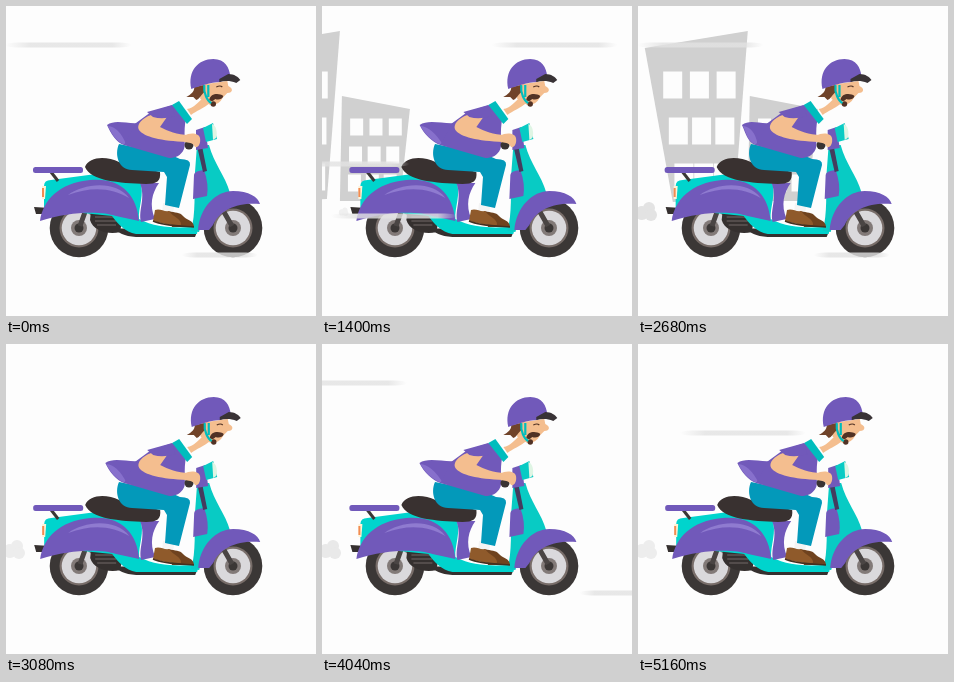
Recreate the animation shown at these times as an HTML page. Size 310 by 310 pixels, loop 5.2 s.

```html
<!DOCTYPE html>
<html lang="en">
<head>
<meta charset="utf-8">
<title>Scooter ride</title>
<style>
html, body { margin: 0; width: 100%; height: 100%; overflow: hidden; background: #fdfdfd; }
svg { display: block; width: 100vw; height: 100vh; }
</style>
</head>
<body>
<svg viewBox="0 0 310 310">
  <defs>
    <linearGradient id="fade">
      <stop offset="0" stop-color="#e2e2e2" stop-opacity="0"/>
      <stop offset=".2" stop-color="#e2e2e2" stop-opacity=".8"/>
      <stop offset=".85" stop-color="#e2e2e2" stop-opacity=".8"/>
      <stop offset="1" stop-color="#e2e2e2" stop-opacity="0"/>
    </linearGradient>
    <g id="wheel">
      <circle r="29.3" fill="#3b3736"/>
      <circle r="19.5" fill="#786d69"/>
      <circle r="17.3" fill="#dad9dc"/>
      <circle r="8" fill="#827a78"/>
      <circle r="4.5" fill="#3b3736"/>
    </g>
  </defs>

  <g id="town1"></g>
  <g id="town2"></g>
  <g id="puff" fill="#e3e3e3">
    <circle cx="-4" cy="1" r="7"/><circle cx="3" cy="-4" r="6"/><circle cx="5" cy="3" r="6"/>
  </g>

  <!-- wheels -->
  <use href="#wheel" x="73" y="222"/>
  <use href="#wheel" x="227" y="222"/>
  <path stroke="#4a4544" stroke-width="5" d="M79 206 74 220M218 206 226 220"/>

  <g id="scooter">
    <path fill="#35302f" d="M28 201 44 202 41 208H30ZM85 205H118L114 226C103 229 87 225 84 214ZM108 222 191 226 189 231H130C118 230 112 227 108 222Z"/>
    <path fill="none" stroke="#5d5655" stroke-width="1.5" d="M89 211h20M89 215h21M91 219h19"/>
    <path fill="#00d4cd" d="M38 180Q38 174 45 174L90 168 134 175C139 188 132 202 133 213 150 222 170 222 186 221L192 222 191 228 130 228C119 226 112 218 106 210L38 203Z"/>
    <path fill="#fff3d6" d="M36 180h4l-1 13h-3Z"/>
    <path fill="#f28c52" d="M36 182h2v9h-2Z"/>
    <path fill="#7159ba" d="M134 177H153C146 187 143 199 149 213L135 216C132 204 140 193 134 177Z"/>
    <path fill="#7159ba" d="M34 215C37 194 53 177 84 174 115 171 131 189 133 215L110 210C95 205 65 205 34 215Z"/>
    <path fill="#8f7bd0" d="M62 189C78 177 110 174 123 192 106 182 86 180 62 189Z"/>
    <path stroke="#3b3736" stroke-width="3" d="M45 166 52 175"/>
    <rect x="27" y="161" width="50" height="6" rx="2.5" fill="#7159ba"/>
    <path fill="#393130" d="M79 161C83 150 101 150 113 156 126 163 141 162 154 166 155 175 151 178 140 178 113 177 85 175 79 161Z"/>

    <!-- leg shield and front fender -->
    <path fill="#08cbc4" d="M191 139H203C208 158 219 169 224 187 208 194 198 207 193 226L185 225C190 207 188 187 189 166Z"/>
    <path fill="#7159ba" d="M188 169Q188 165 198 164 203 178 201 190L187 193Z"/>
    <path fill="#443c5e" d="M191 140H196L201 165 197 166Z"/>
    <path fill="#7159ba" d="M190 124 199 121 202 142 190 144Z"/>
    <path fill="#08cbc4" d="M197 122 207 117 211 133 200 136Z"/>
    <path fill="#dff5e4" d="M206 118C210 119 212 127 210 132L207 134Z"/>
    <path fill="#7159ba" d="M192 224C194 201 210 185 227 185 243 185 252 191 254 198 233 196 214 203 207 219L203 224Z"/>
  </g>

  <!-- legs -->
  <path fill="#f4f4f4" d="M157 197h12l-2 10h-11Z"/>
  <path fill="#6f431f" d="M163 205C169 207 174 206 177 210 180 214 188 214 188 221H166Z"/>
  <path fill="#8f5a2b" d="M149 204C154 202 158 206 163 205 167 211 176 213 175 219 164 220 156 217 147 215Z"/>
  <path fill="none" stroke="#46301f" stroke-width="1.5" d="M147 215C158 220 174 220 188 221"/>
  <path fill="#0399ba" d="M113 138C108 149 113 164 126 164L158 166 161 171 159 199 173 202 184 159Q185 153 174 153L163 148Z"/>

  <!-- upper body -->
  <g id="rider">
    <path id="tail" fill="#7159ba"/>
    <path id="lining" fill="#8770cc"/>
    <path fill="#7159ba" d="M145 106 170 98 180 113C177 125 180 139 178 143 175 150 169 152 163 152L118 139 130 117Z"/>
    <path fill="#f4be8f" d="M145 109C136 112 130 119 133 124 138 131 155 135 181 136L183 129C171 129 162 125 154 121L161 111Z"/>
    <path fill="#7159ba" d="M141 106 166 99 169 110Q157 114 147 111Z"/>
    <path fill="#f4be8f" d="M181 103C188 102 192 96 196 93L204 97C198 102 190 105 185 109Z"/>
    <path fill="#00bdbd" d="M166 99 173 95 186 113 181 118Z"/>
  </g>
  <circle cx="183" cy="139" r="4.5" fill="#3a3433"/>
  <path fill="#f4be8f" d="M178 130C184 126 193 127 194 132 195 138 192 142 189 141 187 136 182 137 179 136Z"/>

  <g id="head">
    <path fill="#f4be8f" d="M193 79 221 75 222 80C227 82 227 87 221 87L217 91Q212 100 204 99L194 93Z"/>
    <path fill="#704329" d="M188 81 198 79 198 86C194 90 193 93 190 94L187 91 180 91C185 88 188 86 188 81Z"/>
    <path fill="#513225" d="M203 94C204 87 213 87 217 90 216 94 211 94 209 93 207 95 205 96 203 94Z"/>
    <circle cx="207" cy="98" r="2.7" fill="#513225"/>
    <path fill="none" stroke="#513225" stroke-width="1.2" d="M210 81q4-2 6 0"/>
    <path fill="none" stroke="#00bdbd" stroke-width="2.2" d="M198 79C197 87 201 95 205 97M202 79 202 91"/>
    <path fill="#7159ba" d="M185 83C181 65 192 53 207 53 219 53 223 62 224 70L214 76C204 76 194 80 185 83Z"/>
    <path fill="#393336" d="M213 73 222 68C228 68 232 71 234 74L230 77C223 74 218 75 213 76Z"/>
  </g>
  <g id="streaks"></g>
</svg>
<script>
const $ = id => document.getElementById(id);
const LOOP = 5200, TOWN_SPEED = .522, WIND_SPEED = 1.15;
const clamp = v => Math.max(0, Math.min(1, v));
const lerp = (a, b, f) => a + (b - a) * f;
const ease = v => v * v * (3 - 2 * v);

function add(parent, tag, attrs) {
  const el = document.createElementNS("http://www.w3.org/2000/svg", tag);
  for (const k in attrs) el.setAttribute(k, attrs[k]);
  parent.append(el);
  return el;
}

// A tapered wall (corners clockwise from top left) with a grid of upright windows
function house(parent, [a, b, c, d], cols, w, h, top, gap) {
  add(parent, "polygon", { points: [a, b, c, d].join(" "), fill: "#d0d0d0" });
  for (let row = 0; row < 3; row++) for (let col = 0; col < cols; col++) {
    const y = top + gap * row;
    const left = lerp(a[0], d[0], (y - a[1]) / (d[1] - a[1]));
    const right = lerp(b[0], c[0], (y - b[1]) / (c[1] - b[1]));
    const x = lerp(left, right, cols > 1 ? .23 + .29 * col : .5);
    add(parent, "rect", { x: x - w / 2, y: y - h / 2, width: w, height: h, fill: "#fdfdfd" });
  }
}

for (const town of [$("town1"), $("town2")]) {
  house(town, [[0, 42], [103, 25], [90, 193], [28, 196]], 3, 19, 27, 79, 46);
  house(town, [[105, 90], [173, 103], [163, 195], [103, 195]], 3, 13, 17, 121, 28);
}
house($("town1"), [[-34, 147], [9, 132], [17, 195], [-36, 195]], 1, 24, 28, 171, 40);

// For each height, the moments when a streak leaves the stage
const lanes = {
  39: [109, 830, 1657, 2789, 4114],
  89: [3797, 4601, 5306],
  158: [1476, 4862],
  210: [1517],
  249: [219, 935, 1767, 2190, 2899, 3590, 4330]
};
const wind = Object.entries(lanes).flatMap(([y, exits]) => exits.map(exit => {
  const width = y > 240 ? 76 : 126;
  const el = add($("streaks"), "rect", { y: y - 2.5, width, height: 5, rx: 12, ry: 2.5, fill: "url(#fade)" });
  return { el, exit, width };
}));

const move = (id, x, y = 0, rest = "") => $(id).setAttribute("transform", `translate(${x} ${y}) ${rest}`);

function draw(t) {
  move("town1", TOWN_SPEED * (1237 - t));
  move("town2", TOWN_SPEED * (2693 - t));
  for (const w of wind) w.el.setAttribute("x", WIND_SPEED * (w.exit - t) - w.width);

  // exhaust swells as it drifts back, then thins out
  const age = t % 1040, grow = ease(clamp((age - 280) / 280));
  move("puff", 25 - 17 * grow, 206, `scale(${.3 + .7 * grow})`);
  $("puff").setAttribute("opacity", clamp(grow * 2.5) * (1 - .4 * clamp((age - 800) / 200)));

  const sway = Math.sin(t / 520 * 2 * Math.PI);
  move("scooter", -.4 * sway);
  move("rider", -.4 * sway);
  move("head", .3 - sway);
  const tip = 101 + 4 * sway;
  $("tail").setAttribute("d", `M${tip} 119C${tip + 8} 113 121 118 132 117L157 137 118 139C110 136 ${tip + 4} 128 ${tip} 119Z`);
  $("lining").setAttribute("d", `M${tip + 1} 120Q${tip + 12} 121 120 138L117 138C110 135 ${tip + 5} 128 ${tip + 1} 120Z`);
}

const start = performance.now();
function tick(now) {
  const t = Math.max(0, now - start) % LOOP;
  draw(Math.floor(t / 40) * 40);
  requestAnimationFrame(tick);
}
draw(0);
requestAnimationFrame(tick);
</script>
</body>
</html>
```
